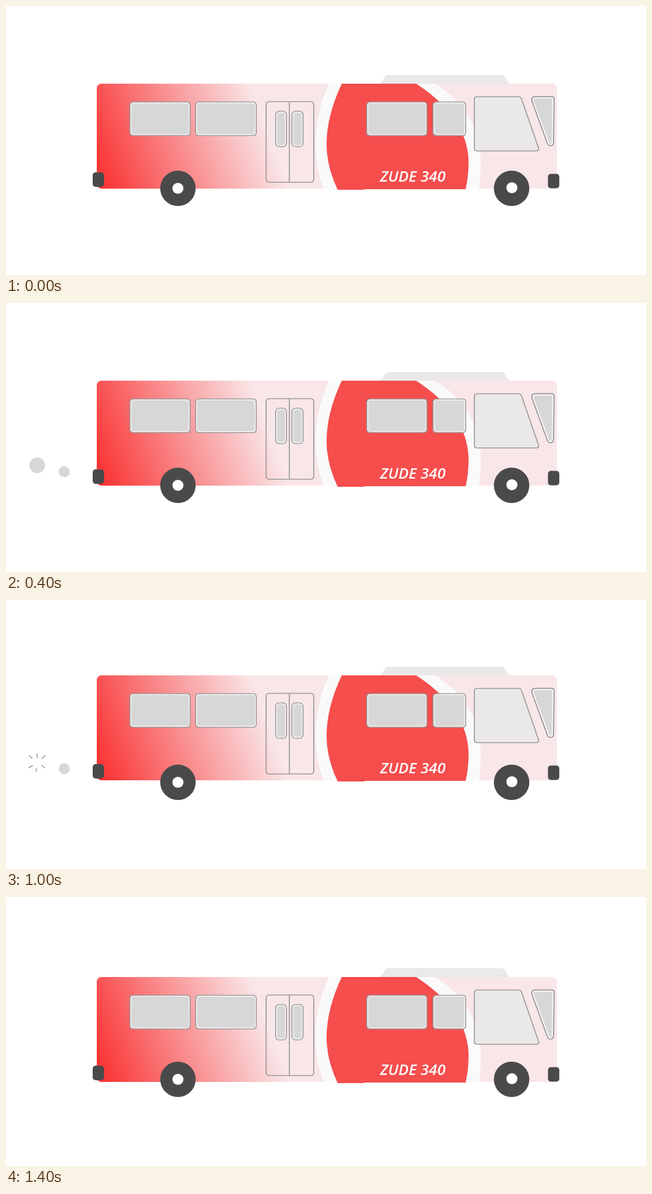
An HTML page that plays this animation: 1100x464 px, repeating every 1.6 s.

```html
<!DOCTYPE html>
<html lang="en">
<head>
<meta charset="utf-8">
<title>Bus</title>
<style>
html, body { margin: 0; width: 100%; height: 100%; overflow: hidden; background: #fff; }
svg { display: block; width: 1100px; height: 464px; }
.outline { fill: none; stroke: #999; stroke-width: 1.7; }
.glass { fill: #d7d7d7; stroke: #fff; stroke-width: 1.5; }
.dark { fill: #4a4a4a; }
.puff circle { fill: #d7d7d7; }
.puff path { fill: none; stroke: #8f8f8f; stroke-width: 1.5; vector-effect: non-scaling-stroke; }
text { font: italic 600 26px "Open Sans", "Noto Sans", sans-serif; fill: #fff; }
</style>
</head>
<body>
<svg viewBox="0 0 1100 464">
  <defs>
    <linearGradient id="paint" gradientUnits="userSpaceOnUse" x1="156" y1="290" x2="440" y2="188">
      <stop offset="0" stop-color="#fa3232"/>
      <stop offset="1" stop-color="#f9e6e8"/>
    </linearGradient>
  </defs>

  <g id="puffs"></g>

  <g id="bus">
    <path fill="#eae8e8" d="M643 134.500L654 119H855L865 134.500Z"/>
    <rect x="156" y="134" width="791" height="181" rx="8" fill="url(#paint)"/>
    <path fill="#fafafa" d="M555 134Q532 185 532 238Q532 280 546 315L570 317H790L813 315Q816 295 816 270C816 215 790 165 737 134Z"/>
    <path fill="#f64d4d" d="M577 134Q551 190 551 238Q551 277 570 317H616V316H790Q795 295 795 270C795 215 760 170 705 134Z"/>
    <g id="windows"></g>
    <rect class="outline" x="447" y="165" width="82" height="139" rx="5"/>
    <path class="outline" d="M487 165V304"/>
    <path class="outline" style="fill:#eae9e8" d="M809 156.500H881Q884.500 156.500 886 160L915 244Q917 250 911 250H810Q805 250 805 245V161Q805 156.500 809 156.500Z"/>
    <path class="outline" style="stroke-width:2" d="M909 156.500H938Q942 156.500 942 160.500L941 236Q940.500 241 936 241Q932 241 930.500 237L904 164Q902.500 157 909 156.500Z"/>
    <path class="glass" d="M910 158.500H937.500Q940 158.500 940 161L939 235.500Q938.500 239 936 239Q933.500 239 932.500 236L906 163.500Q905 159 910 158.500Z"/>
    <rect class="dark" x="149" y="287" width="19.500" height="25" rx="5"/>
    <rect class="dark" x="931.500" y="289.500" width="19.500" height="25" rx="5"/>
    <text x="643" y="302.500">ZUDE 340</text>
  </g>

  <circle class="dark" cx="295.500" cy="314.500" r="30.500"/>
  <circle cx="295.500" cy="314.500" r="9.500" fill="#fff"/>
  <circle class="dark" cx="869" cy="314.500" r="30.500"/>
  <circle cx="869.500" cy="313.500" r="9.500" fill="#fff"/>
</svg>
<script>
const STEP = 200, STEPS = 8;
const get = id => document.getElementById(id);

// x, y, width, height, corner radius
const panes = [
  [213, 165.5, 103.5, 58, 5], [326, 165.5, 104, 58, 5],
  [620, 165.5, 103.5, 58, 5], [734, 165.5, 56, 58, 5],
  [463.5, 181.5, 18.5, 61, 6], [491.5, 181.5, 19, 61, 6]
];
const rect = (cls, [x, y, w, h, r], inset) =>
  `<rect class="${cls}" x="${x + inset}" y="${y + inset}" width="${w - 2 * inset}" height="${h - 2 * inset}" rx="${r - inset / 2}"/>`;
get("windows").innerHTML = panes.map(p => rect("glass", p, 1.5) + rect("outline", p, 0)).join("");

// Each puff appears at step `from` and bursts for one step at `pop`
const puffs = [
  { x: 100, y: 291, r: 9.5, burst: 0.8, from: 1, pop: 6 },
  { x: 53.5, y: 280, r: 13.5, burst: 1, from: 2, pop: 5 },
  { x: 95, y: 237.5, r: 18.5, burst: 1.9, from: 3, pop: 4 }
];
const rays = "M-8-6.5L-14-12M7.5-6L14.5-12M7.5 5L13.5 10M-1.5 10V16M-7.5 5.5L-14.5 9.5M-.5-15L.5-8";
get("puffs").innerHTML = puffs.map(p =>
  `<g class="puff" transform="translate(${p.x} ${p.y})"><circle r="${p.r}"/><path transform="scale(${p.burst})" d="${rays}"/></g>`
).join("");

const show = (el, on) => el.setAttribute("visibility", on ? "visible" : "hidden");
const start = performance.now();

function draw() {
  const step = Math.floor((performance.now() - start) / STEP) % STEPS;
  const bob = -4 * Math.round(Math.sin(step * Math.PI / 2));
  get("bus").setAttribute("transform", `translate(0 ${bob})`);
  puffs.forEach((p, i) => {
    const [ball, burst] = get("puffs").children[i].children;
    show(ball, step >= p.from && step < p.pop);
    show(burst, step === p.pop);
  });
  requestAnimationFrame(draw);
}
draw();
</script>
</body>
</html>
```
